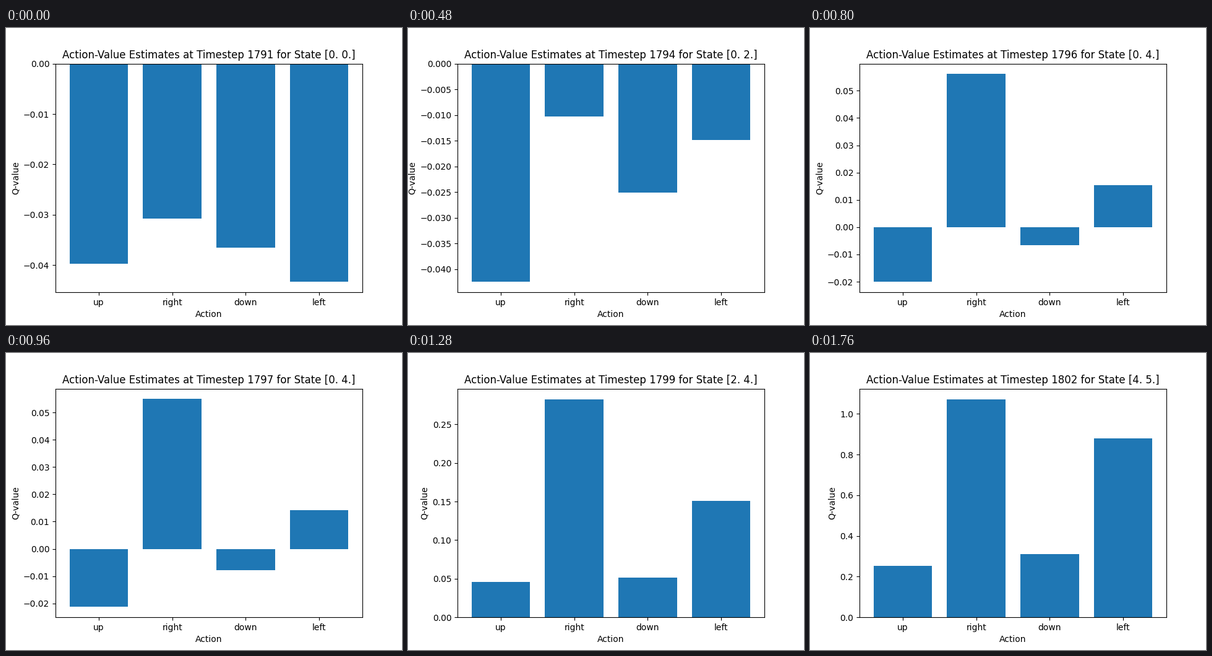
A matplotlib script that plays this animation: 640 by 480 pixels, repeating every 1920 ms.

```python
import matplotlib.pyplot as plt
import numpy as np
from matplotlib.animation import FuncAnimation

ACTIONS = ["up", "right", "down", "left"]
FIRST_STEP = 1791
MOVES = ".RRRR.DDDDR"      # R: next column, D: next row, '.': stay put
PENALTY = 0.0012           # lost on every action when the agent stays put
BLEND = 0.45               # share of the next key estimate in a step between

# Key estimates per step: up, right, down, left
KEYS = {
    0: (-0.0397, -0.03076, -0.03653, -0.04324),
    2: (-0.0438, -0.02444, -0.03079, -0.02706),
    4: (-0.04064, 0.00704, -0.01815, 0),
    5: (-0.02007, 0.05612, -0.0066, 0.0154),
    7: (-0.01104, 0.1066, 0.01594, -0.0329),
    9: (0.1159, 0.4965, 0.0948, 0.3755),
    11: (0.253, 1.0706, 0.3108, 0.8796),
}


def state(step):
    done = MOVES[:step]
    return done.count("D"), done.count("R")


def q_values(step):
    if step in KEYS:
        return np.array(KEYS[step])
    before, after = q_values(step - 1), q_values(step + 1)
    if MOVES[step - 1] == ".":
        return before - PENALTY
    return before + BLEND * (after - before)


fig, ax = plt.subplots(figsize=(6.4, 4.8), dpi=100)


def draw(step):
    row, col = state(step)
    ax.clear()
    ax.bar(ACTIONS, q_values(step), color="#1f77b4")
    ax.set_xlabel("Action")
    ax.set_ylabel("Q-value")
    ax.set_title(f"Action-Value Estimates at Timestep {FIRST_STEP + step} "
                 f"for State [{row}. {col}.]")
    return ax.patches


anim = FuncAnimation(fig, draw, frames=len(MOVES) + 1, interval=160,
                     init_func=lambda: draw(0), repeat=True, repeat_delay=0,
                     blit=False)
plt.show()
```
